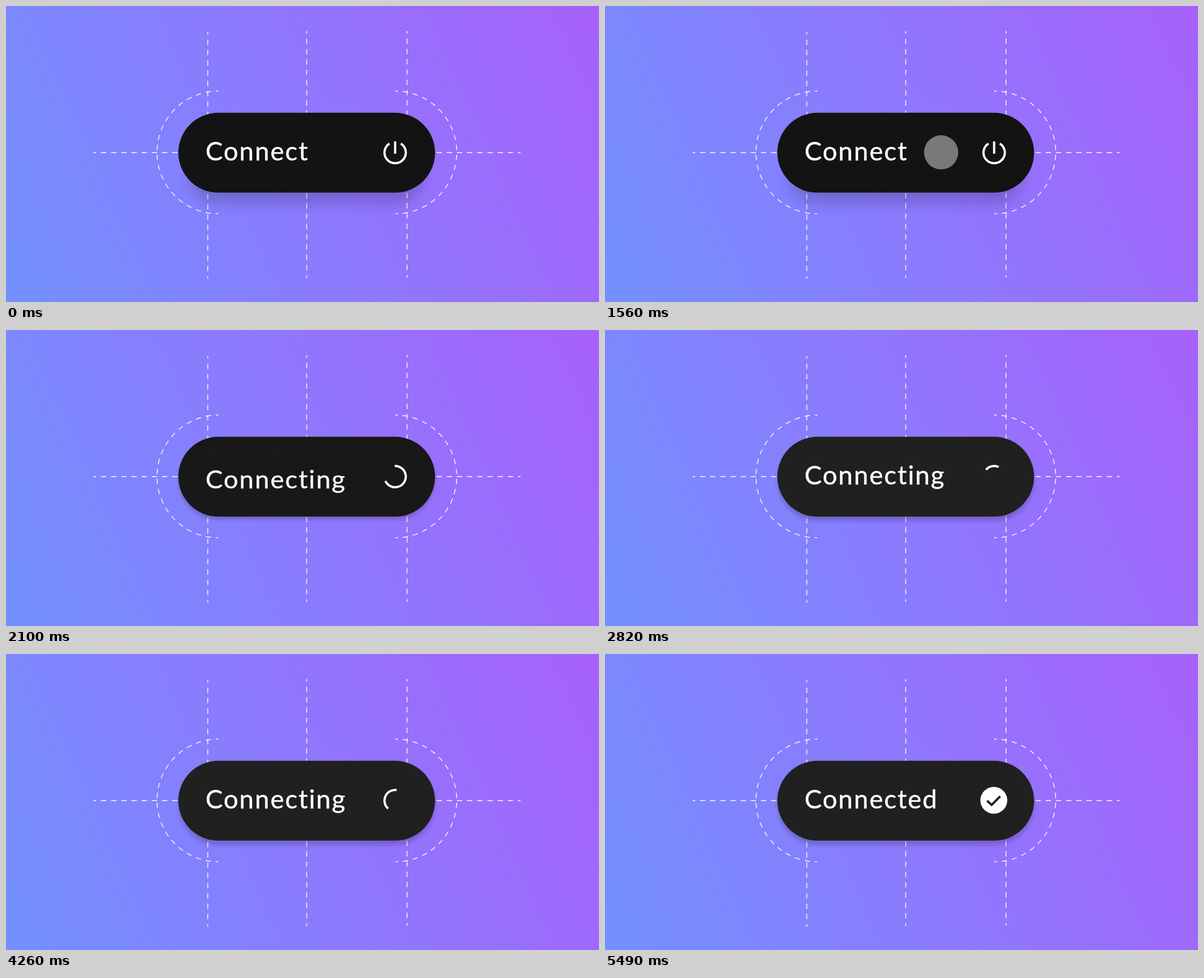
Recreate the animation shown at these times as an HTML page. Size 1058 by 529 pixels, loop 8100 ms.

```html
<!DOCTYPE html>
<html lang="en">
<head>
<meta charset="utf-8">
<title>Connect button</title>
<style>
  html, body { margin: 0; width: 100%; height: 100%; overflow: hidden; }
  body { background: linear-gradient(66deg, #748fff 3%, #8d79fd 50%, #a662fa 98%); }
  svg { display: block; width: 100%; height: 100%; }
  text { font: 400 46px Lato, sans-serif; letter-spacing: 2px; fill: #fff; stroke: #fff; stroke-width: .5; }
  .guide { fill: none; stroke: #fff; stroke-width: 1.4; stroke-dasharray: 9.5 8.5; stroke-dashoffset: 4.75; }
  .icon { fill: none; stroke: #fff; stroke-width: 4; }
</style>
</head>
<body>
<svg viewBox="0 0 1058 529">
  <g id="guides"></g>
  <g id="button">
    <rect id="shadow"/>
    <rect id="pill" x="307.5" y="190.8" width="458" height="142.8" rx="71.4"/>
    <g id="words"></g>
    <path id="ring" class="icon"/>
    <line id="stem" class="icon" x1="694.3" x2="694.3" y1="242"/>
    <circle id="dot" cx="693.7" cy="261.5" fill="#fff"/>
    <path id="check" d="M681.8 262.3L689.8 269.8L705 254.3" pathLength="1"
          fill="none" stroke="#202020" stroke-width="4" stroke-dasharray="1 2"/>
  </g>
  <circle id="pointer" cx="599.7" cy="261.6" fill="#fff"/>
</svg>
<script>
const LOOP = 8100, FRAME = 30;
const $ = id => document.getElementById(id);
const set = (el, attrs) => { for (const k in attrs) el.setAttribute(k, attrs[k]); };
const add = (parent, tag, attrs) => {
  const el = document.createElementNS('http://www.w3.org/2000/svg', tag);
  set(el, attrs);
  return parent.appendChild(el);
};

const mix = (a, b, p) => a + (b - a) * p;
const ramp = (t, from, to) => Math.min(1, Math.max(0, (t - from) / (to - from)));
const easeOut = p => 1 - (1 - p) ** 2;
const easeInOut = (p, n) => p < .5 ? (2 * p) ** n / 2 : 1 - (2 - 2 * p) ** n / 2;

// Dashes are fitted to each path so that it starts and ends with half a dash.
for (const d of [
  'M360 46.5V487.5', 'M536.5 45V486', 'M715.5 44.5V485.5', 'M156 262H918',
  'M379 152A109.7 109.7 0 0 0 379 371.4', 'M694.5 152A109.7 109.7 0 0 1 694.5 371.4'
]) {
  const path = add($('guides'), 'path', { d, class: 'guide' });
  set(path, { pathLength: 18 * Math.round(path.getTotalLength() / 18.2) });
}

const words = ['Connect', 'Connecting', 'Connected'].map(label => {
  const el = add($('words'), 'text', { x: 356, y: 276 });
  el.textContent = label;
  return el;
});

// Time, leading end and trailing end of the ring, in degrees clockwise from the top.
const ringKeys = [
  [1750, 32, 328], [1890, 12, 310], [2820, -50, 25],
  [4260, -499, -352], [5130, -792, -784], [5160, -800, -800]
];

function ringEnds(t) {
  if (t <= ringKeys[0][0]) return ringKeys[0].slice(1);
  const i = ringKeys.findIndex(key => key[0] >= t);
  if (i < 0) return [0, 0];
  const [a, b] = [ringKeys[i - 1], ringKeys[i]];
  const p = ramp(t, a[0], b[0]);
  return [mix(a[1], b[1], p), mix(a[2], b[2], p)];
}

function arcPath([start, end]) {
  if (end - start < .1) return '';
  const point = deg => {
    const a = deg * Math.PI / 180;
    return `${694.3 + 19 * Math.sin(a)} ${262 - 19 * Math.cos(a)}`;
  };
  return `M${point(start)}A19 19 0 ${end - start > 180 ? 1 : 0} 1 ${point(end)}`;
}

function drawShadow(t) {
  const press = ramp(t, 1560, 1740), lift = ramp(t, 1740, 2250);
  const inset = mix(20, 0, press);
  const drop = mix(mix(40, 0, press), 8, lift);
  const blur = mix(mix(12, 2, press), 3.5, lift);
  const height = 142.8 - 2 * inset;
  set($('shadow'), {
    x: 307.5 + inset, y: 190.8 + inset + drop,
    width: 458 - 2 * inset, height, rx: height / 2,
    opacity: .17, style: `filter: blur(${blur}px)`
  });
}

// Words sit a quarter turn apart on a drum that rolls upwards.
function drawWords(t) {
  const turn = easeInOut(ramp(t, 1750, 2250), 3) + easeInOut(ramp(t, 4970, 5470), 3);
  words.forEach((el, i) => {
    const angle = (i - turn) * Math.PI / 2;
    const scale = Math.cos(angle);
    const visible = Math.abs(i - turn) < 1;
    set(el, {
      transform: `translate(0 ${261 + 43 * Math.sin(angle)}) scale(1 ${scale}) translate(0 -261)`,
      opacity: visible ? scale ** 2 : 0
    });
  });
}

function draw(t) {
  const pressed = easeOut(ramp(t, 1560, 1740)) - easeOut(ramp(t, 1740, 2000));
  set($('button'), {
    transform: `translate(536.5 262.2) scale(${1 - .055 * pressed}) translate(-536.5 -262.2)`
  });
  set($('pointer'), {
    r: 30.5 * (1 - .24 * pressed),
    opacity: .43 * (ramp(t, 1050, 1200) - ramp(t, 1740, 2000))
  });
  const shade = Math.round(mix(19, 32, ramp(t, 1950, 2350)));
  set($('pill'), { fill: `rgb(${shade},${shade},${shade})` });
  drawShadow(t);
  drawWords(t);

  set($('ring'), { d: arcPath(ringEnds(t)) });
  set($('stem'), { y2: 264 - 22 * easeInOut(ramp(t, 1750, 2050), 2) });
  set($('dot'), { r: 24 * easeInOut(ramp(t, 5040, 5340), 2) });
  const drawn = easeOut(ramp(t, 5250, 5490));
  set($('check'), { 'stroke-dashoffset': 1 - drawn, opacity: drawn > 0 ? 1 : 0 });
}

function tick() {
  const t = performance.now() % LOOP;
  draw(Math.floor(t / FRAME) * FRAME);
  requestAnimationFrame(tick);
}
tick();
</script>
</body>
</html>
```
